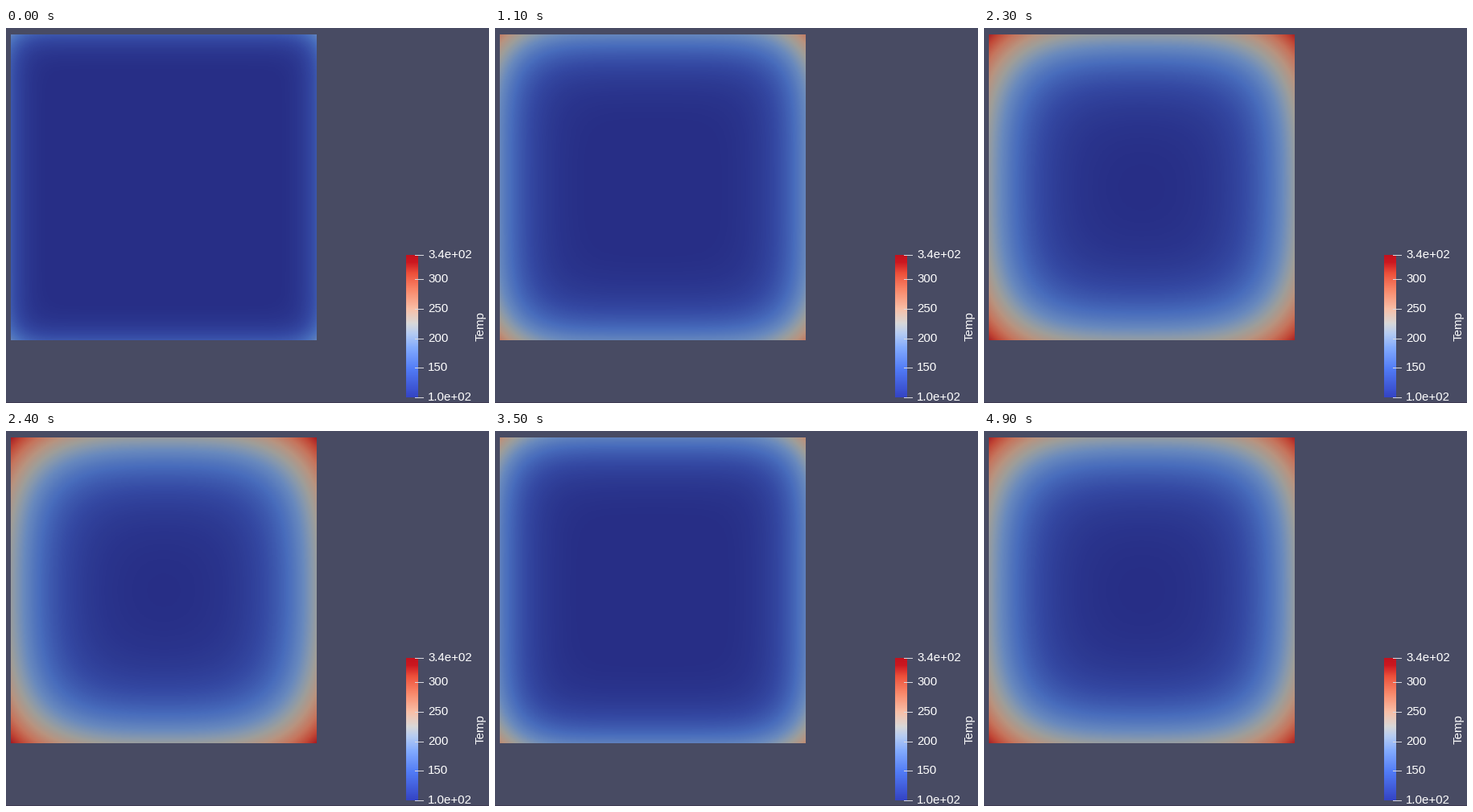
Recreate the animation shown at these times as a matplotlib script. Size 600 by 466 pixels, loop 5000 ms.

```python
import math

import matplotlib.pyplot as plt
import numpy as np
from matplotlib.animation import FuncAnimation
from matplotlib.colors import LinearSegmentedColormap
from matplotlib.patches import Rectangle

W, H, DPI = 600, 466, 100
FRAMES, INTERVAL = 50, 100
LOW, HIGH = 100, 341.5
SIDE, LEFT, TOP = 380, 6, 8
BAR_TOP, BAR_BOTTOM = 282, 459
RUN = 26             # frames per heating run, the last one held
START, END = 3.3, 26.3


def ramp(name, stops):
    colors = [(p, tuple(c / 255 for c in rgb)) for p, rgb in stops]
    return LinearSegmentedColormap.from_list(name, colors, N=256)


bar_map = ramp("bar", [
    (0, (52, 68, 196)), (0.2, (82, 124, 246)), (0.35, (132, 172, 254)),
    (0.45, (182, 204, 242)), (0.52, (216, 216, 216)), (0.62, (248, 192, 168)),
    (0.75, (250, 138, 108)), (0.87, (238, 82, 60)), (0.95, (204, 24, 32)),
    (1, (194, 18, 30))])
plate_map = ramp("plate", [
    (0, (39, 46, 134)), (0.12, (52, 72, 162)), (0.25, (72, 108, 188)),
    (0.37, (104, 137, 190)), (0.45, (134, 152, 174)), (0.52, (158, 158, 154)),
    (0.62, (184, 148, 128)), (0.75, (198, 116, 92)), (0.87, (194, 74, 56)),
    (1, (164, 24, 32))])

erfc = np.vectorize(math.erfc)
depth = np.arange(SIDE) + 0.5


def profile(t):
    """Rise along one axis for constant heat flux at both ends."""
    root = math.sqrt(t / END)

    def side(x):
        s = x / (100 * root)
        return np.exp(-s * s) - math.sqrt(math.pi) * s * erfc(s)

    return 118 * root * (side(depth) + side(SIDE - depth))


def temperature(i):
    step = min(i, RUN - 2) if i < RUN else i - RUN
    u = profile(START + step)
    return LOW + u[:, None] + u[None, :]


fig = plt.figure(figsize=(W / DPI, H / DPI), dpi=DPI, facecolor="#484b63")
ax = fig.add_axes([0, 0, 1, 1])
ax.axis("off")

plate = ax.imshow(temperature(0), cmap=plate_map, vmin=LOW, vmax=HIGH,
                  extent=(LEFT, LEFT + SIDE, TOP + SIDE, TOP),
                  interpolation="nearest")
ax.imshow(np.linspace(1, 0, 256)[:, None], cmap=bar_map, vmin=0, vmax=1,
          extent=(497, 512, BAR_BOTTOM, BAR_TOP), interpolation="nearest")
ax.add_patch(Rectangle((0, H - 1), W, 1, color="#3e3a52", lw=0))

font = dict(family="Liberation Sans", color="white", fontsize=15 * 72 / DPI)
labels = {LOW: "1.0e+02", 150: "150", 200: "200", 250: "250", 300: "300",
          HIGH: "3.4e+02"}
for value, label in labels.items():
    y = BAR_BOTTOM - (value - LOW) / (HIGH - LOW) * (BAR_BOTTOM - BAR_TOP)
    ax.plot([508, 518], [y, y], color="#d8d8de", lw=0.72)
    ax.text(524, y + 4, label, va="baseline", **font)
ax.text(594, 389, "Temp", rotation=90, rotation_mode="anchor",
        ha="left", va="baseline", **font)

ax.set_xlim(0, W)
ax.set_ylim(H, 0)
ax.set_aspect("auto")


def update(i):
    plate.set_data(temperature(i))
    return (plate,)


anim = FuncAnimation(fig, update, frames=FRAMES, interval=INTERVAL,
                     repeat=True, repeat_delay=0)
plt.show()
```
